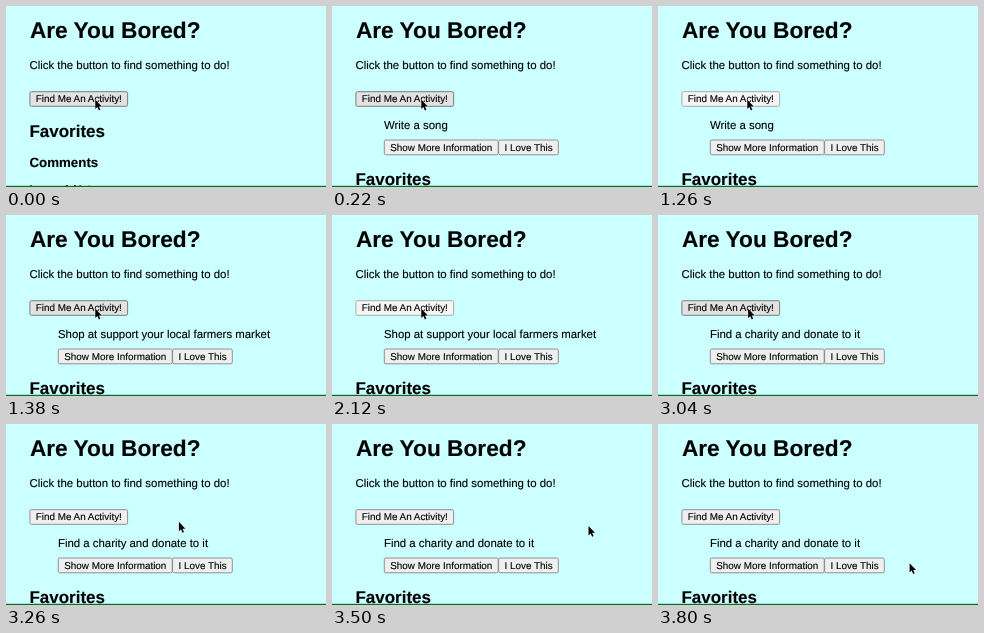
An HTML page for the animation above (4.52 s loop, 320 by 181 pixels).

```html
<!DOCTYPE html>
<html lang="en">
<head>
<meta charset="utf-8">
<title>Are You Bored?</title>
<style>
html, body { margin: 0; width: 100%; height: 100%; overflow: hidden; background: #cff; }
svg { display: block; width: 100%; height: 100%; }
text {
  font-family: "Liberation Sans", Arial, sans-serif; font-size: 11.4px;
  fill: #000; stroke: #000; stroke-width: .12; text-rendering: geometricPrecision;
}
.h1 { font-size: 22.7px; font-weight: bold; }
.h2 { font-size: 17px; font-weight: bold; }
.h3 { font-size: 13.3px; font-weight: bold; }
.button rect { fill: #efefef; stroke: #858585; stroke-width: .9; }
.button text { font-size: 9.9px; text-anchor: middle; }
.button .pressed { fill: #f5f5f5; stroke: #a4a4a4; }
.button .hover { fill: #e2e2e2; stroke: #707070; }
</style>
</head>
<body>
<svg viewBox="0 0 320 181">
  <rect width="320" height="181" fill="#cff"/>
  <text class="h1" x="23.9" y="32.2">Are You Bored?</text>
  <text x="23.5" y="63">Click the button to find something to do!</text>
  <g class="button">
    <rect id="find" x="23.9" y="85.7" width="97.7" height="14.6" rx="1.6"/>
    <text x="72.8" y="96.3">Find Me An Activity!</text>
  </g>
  <g id="result">
    <text id="activity" x="52" y="122.6"></text>
    <g class="button">
      <rect x="52.3" y="134" width="113.9" height="14.8" rx="1.6"/>
      <text x="109.3" y="144.8">Show More Information</text>
      <rect x="166.6" y="134" width="59.7" height="14.8" rx="1.6"/>
      <text x="196.6" y="144.8">I Love This</text>
    </g>
  </g>
  <g id="lists">
    <text class="h2" x="23.4" y="130.9">Favorites</text>
    <text class="h3" x="23.5" y="160.6">Comments</text>
    <text x="23.5" y="186.9">Leave A Note</text>
  </g>
  <rect y="179.8" width="320" height="1.2" fill="#086a24"/>
  <path id="cursor" d="M0 0V9.4L2.1 7.4 3.6 10.8 5.1 10.1 3.6 6.8H6.5Z"
    fill="#000" stroke="#fff" stroke-width=".7" paint-order="stroke"/>
</svg>
<script>
const LOOP = 4520;
const $ = id => document.getElementById(id);

const activities = [
  [0, ""],
  [220, "Write a song"],
  [1380, "Shop at support your local farmers market"],
  [2240, "Write a song"],
  [2880, "Find a charity and donate to it"]
];
const presses = [[40, 140], [1260, 1380], [2120, 2220], [2600, 2860]];

const clamp = v => Math.max(0, Math.min(1, v));
const smooth = v => v * v * (3 - 2 * v);
const mix = (a, b, p) => a + (b - a) * p;

function pointer(t) {
  if (t < 3500) {
    const p = smooth(clamp((t - 3020) / 480));
    return [mix(89.3, 256.5, p), mix(93.7, 102, p)];
  }
  const p = clamp((t - 3500) / 300);
  const e = 1 - Math.pow(1 - p, 1.7);
  return [mix(256.5, 251.6, e), mix(102, 139.2, e)];
}

function draw(t) {
  const text = activities.filter(a => t >= a[0]).pop()[1];
  const [x, y] = pointer(t);
  const pressed = presses.some(([a, b]) => t >= a && t < b);
  const hover = x < 122 && y < 101;

  $("find").setAttribute("class", pressed ? "pressed" : hover ? "hover" : "");
  if ($("activity").textContent !== text) $("activity").textContent = text;
  $("result").style.display = text ? "" : "none";
  $("lists").setAttribute("transform", `translate(0 ${text ? 48.2 : 0})`);
  $("cursor").setAttribute("transform", `translate(${x} ${y})`);
}

const start = performance.now();
function tick() {
  const t = (performance.now() - start) % LOOP;
  draw(Math.floor(t / 20) * 20);
  requestAnimationFrame(tick);
}
draw(0);
requestAnimationFrame(tick);
</script>
</body>
</html>
```
